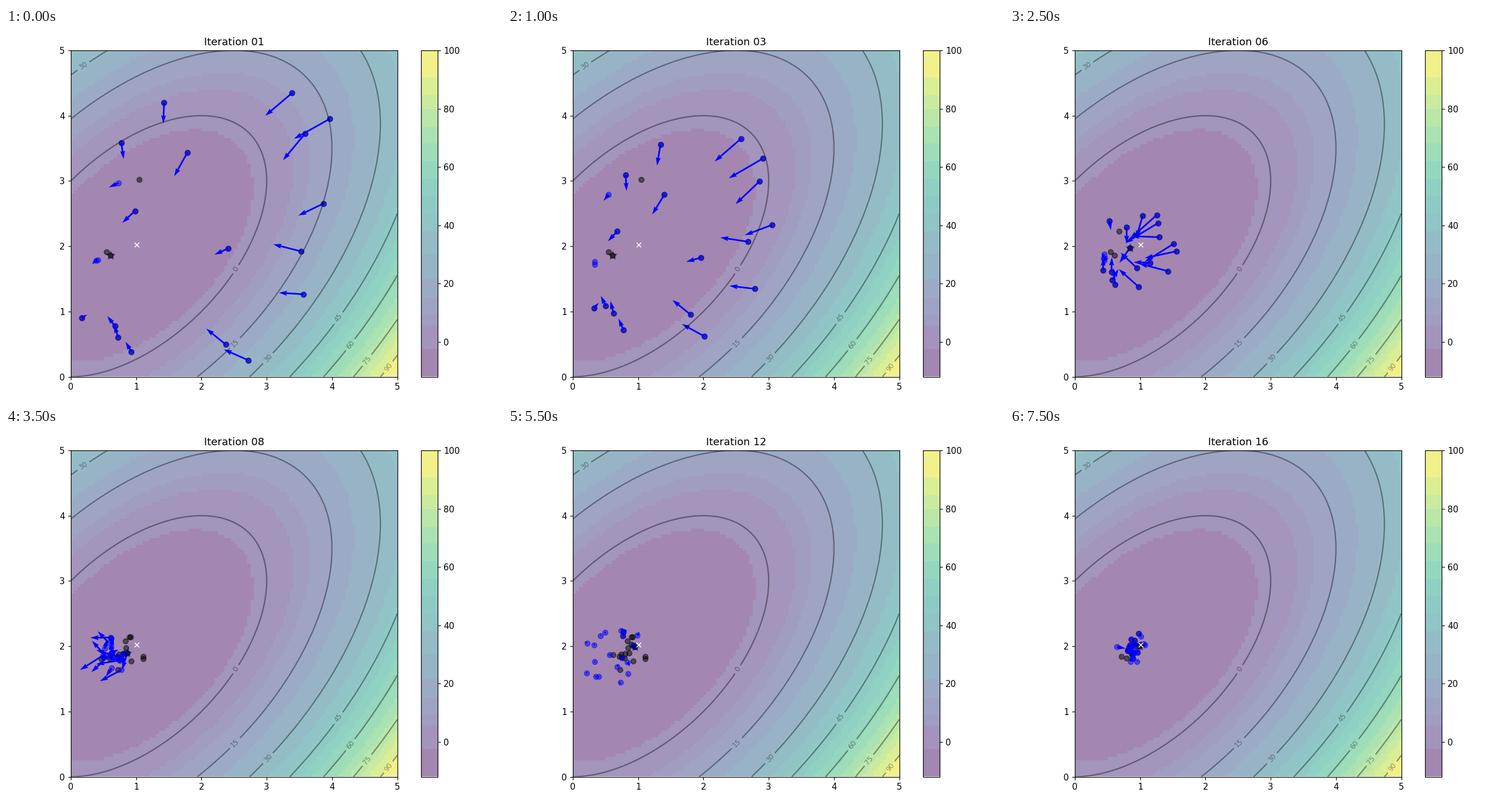
A matplotlib script that plays this animation: 864 px wide and 648 px high, repeating every 8000 ms.

```python
import numpy as np
import matplotlib.pyplot as plt
from matplotlib.animation import FuncAnimation
from matplotlib.colors import ListedColormap

W, H, DPI = 864, 648, 108
STEPS = 16
N = 20
INERTIA, C1, C2 = 0.8, 0.1, 0.1


def cost(x, y):
    return 4 * (x**2 - x * y + y**2 - 3 * y)


def simulate(steps):
    """Particle swarm: one (X, V, pbest, gbest) tuple per displayed iteration."""
    rng = np.random.RandomState(100)
    X = rng.rand(2, N) * 5
    V = rng.randn(2, N) * 0.1
    pbest, pbest_obj = X.copy(), cost(*X)
    gbest = pbest[:, pbest_obj.argmin()]
    history = []
    for _ in range(steps + 1):
        r1, r2 = rng.rand(2)
        V = INERTIA * V + C1 * r1 * (pbest - X) + C2 * r2 * (gbest[:, None] - X)
        X = X + V
        obj = cost(*X)
        better = obj <= pbest_obj
        pbest = np.where(better, X, pbest)
        pbest_obj = np.minimum(obj, pbest_obj)
        gbest = pbest[:, pbest_obj.argmin()]
        history.append((X, V, pbest, gbest))
    return history[1:]


def banded_viridis(lo, hi, edges):
    bounds = np.array([lo, *edges, hi])
    mids = (bounds[:-1] + bounds[1:]) / 2
    band = np.digitize(np.linspace(lo, hi, 256), edges)
    return ListedColormap(plt.cm.viridis((mids[band] - lo) / (hi - lo)))


def add_axes(left, top, width, height):
    return fig.add_axes([left / W, 1 - (top + height) / H, width / W, height / H])


states = simulate(STEPS)

fig = plt.figure(figsize=(W / DPI, H / DPI), dpi=DPI)
ax = add_axes(113, 39, 568.5, 568.5)
cax = add_axes(723, 39, 28.5, 568.5)

# Cost surface
x, y = np.meshgrid(np.linspace(0, 5, 100), np.linspace(0, 5, 100))
z = cost(x, y)
edges = [-2.5, 5.5, 9.5, 15, 21.7, 30, 38, 44, 50, 56, 62, 68, 74, 80, 85, 91]
cmap = banded_viridis(z.min(), z.max(), edges)
img = ax.imshow(z, extent=[0, 5, 0, 5], origin="lower", cmap=cmap, alpha=0.5)
fig.colorbar(img, cax=cax)

low = z.argmin()
ax.plot(x.flat[low], y.flat[low], marker="x", markersize=5, color="white")

ax.set(xlim=(0, 5), ylim=(0, 5))
contours = ax.contour(x, y, z, levels=range(0, 91, 15), colors="black", alpha=0.4)
spots = [(2.524, 1.649), (2.515, 0.515), (3.017, 0.286), (0.185, 4.77),
         (4.099, 0.90), (4.275, 0.497), (4.53, 0.26), (4.855, 0.154)]
ax.clabel(contours, inline=True, fontsize=8, fmt="%.0f", manual=spots)

# Swarm
X, V, pbest, gbest = states[0]
pbest_plot = ax.scatter(*pbest, marker="o", color="black", alpha=0.5)
swarm_plot = ax.scatter(*X, marker="o", color="blue", alpha=0.5)
arrows = ax.quiver(*X, *V, color="blue", width=0.005, angles="xy",
                   scale_units="xy", scale=1)
gbest_plot = ax.scatter(*gbest, marker="*", s=100, color="black", alpha=0.4)
ax.set(xlim=(0, 5), ylim=(0, 5))


def animate(i):
    X, V, pbest, gbest = states[i]
    ax.set_title(f"Iteration {i + 1:02d}")
    pbest_plot.set_offsets(pbest.T)
    swarm_plot.set_offsets(X.T)
    # angles="xy" measures arrow directions from XY, so keep it in step
    arrows.set_offsets(X.T)
    arrows.X, arrows.Y, arrows.XY = X[0], X[1], X.T
    arrows.set_UVC(*V)
    gbest_plot.set_offsets(gbest[None, :])
    return pbest_plot, swarm_plot, arrows, gbest_plot


anim = FuncAnimation(fig, animate, frames=STEPS, interval=500,
                     repeat=True, repeat_delay=0, blit=False)
plt.show()
```
